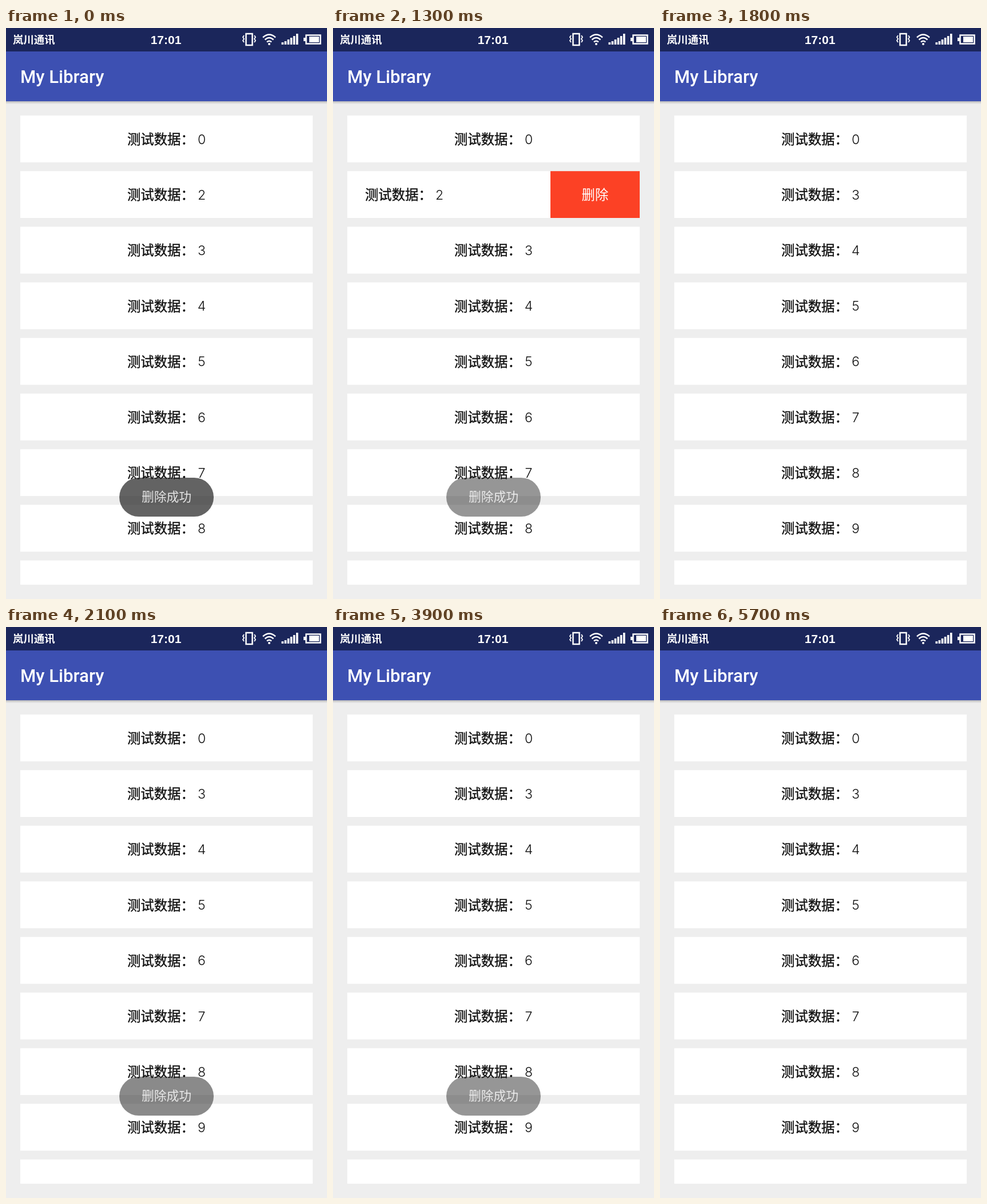
These frames come from a looping animation (561x998 px, 6100 ms). An HTML page:

```html
<!DOCTYPE html>
<html lang="zh-CN">
<head>
<meta charset="utf-8">
<title>My Library</title>
<style>
  html, body { margin: 0; width: 100%; height: 100%; overflow: hidden; background: #eee; }
  svg { display: block; width: 100%; height: 100%; }
  text { font-family: "Noto Sans CJK SC", "Noto Sans CJK", sans-serif; font-size: 23.4px; fill: #fff; }
  .item text { fill: #111; }
  .item .label { stroke: #111; stroke-width: .4px; }
  .item .num { font-family: Inter, "Liberation Sans", sans-serif; font-weight: 300; font-size: 23px; text-anchor: middle; }
  .title { font: 500 31.2px Roboto, sans-serif; }
  .carrier { font-size: 18.4px; font-weight: bold; }
  .clock { font: bold 21px "Liberation Sans", sans-serif; text-anchor: middle; }
  .line { fill: none; stroke: #fff; stroke-width: 2.5; }
  .mid { text-anchor: middle; }
</style>
</head>
<body>
<svg viewBox="0 0 561 998">
  <defs>
    <linearGradient id="shade" x2="0" y2="1">
      <stop stop-color="#000" stop-opacity=".22"/>
      <stop offset="1" stop-color="#000" stop-opacity="0"/>
    </linearGradient>
    <clipPath id="list"><rect x="25" y="133" width="511" height="840"/></clipPath>
  </defs>
  <rect width="561" height="998" fill="#eee"/>
  <g id="rows" clip-path="url(#list)"></g>

  <rect y="128" width="561" height="5" fill="url(#shade)"/>
  <rect y="40" width="561" height="88" fill="#3d50b2"/>
  <rect width="561" height="41" fill="#1b265b"/>
  <text class="title" x="24.900" y="95.700">My Library</text>
  <text class="carrier" x="12" y="27">岚川通讯</text>
  <text class="clock" x="279.5" y="28.300">17:01</text>

  <rect class="line" x="419.5" y="10" width="11" height="20"/>
  <path class="line" style="stroke-width:1.8" d="M416 13l-2 3 2 3-2 3 2 3M434 13l2 3-2 3 2 3-2 3"/>
  <path class="line" d="M449 16.5q11-10 22 0M452.5 20.5q7.500-7 15 0M456 24.500q4-3.500 8 0"/>
  <circle cx="460" cy="28" r="2" fill="#fff"/>
  <g id="signal" fill="#fff"></g>
  <rect class="line" x="524.5" y="12.5" width="25" height="15"/>
  <path fill="#fff" d="M520 17h4v6h-4zM530 15h17v10h-17z"/>

  <g id="toast">
    <rect x="198" y="786" width="165" height="68" rx="34" fill="#222" fill-opacity=".7"/>
    <text class="mid" style="font-size:21.8px;fill:#e4e4e4" x="280.5" y="826.5">删除成功</text>
  </g>
</svg>
<script>
const LOOP = 6100, STEP = 100, PITCH = 97.2, MENU = 156;
const $ = id => document.getElementById(id);
const clamp = v => Math.max(0, Math.min(1, v));
const smooth = v => v * v * (3 - 2 * v);

$("signal").innerHTML = [4, 6, 9, 12, 15, 19].map((h, i) =>
  `<rect x="${481.5 + i * 5.1}" y="${29 - h}" width="3.6" height="${h}"/>`).join("");

const label = `<text class="label" x="211.9" y="50">测试数据：</text><text class="num" x="342" y="49.5"></text>`;

// The last row is cut off above its label
$("rows").innerHTML = Array.from({ length: 9 }, (_, i) => `
  <g transform="translate(0 ${153 + i * PITCH})"><g class="item">
    <rect x="25" width="511" height="81.8" fill="#fff"/>${i < 8 ? label : ""}
  </g></g>`).join("");

const items = [...document.querySelectorAll(".item")];
const nums = [...document.querySelectorAll(".num")];
items[1].insertAdjacentHTML("beforeend",
  `<rect x="536" width="${MENU}" height="81.8" fill="#fc4125"/>
   <text class="mid" style="fill:#fff" x="614" y="50">删除</text>`);

// Share of a run done, counting the step that begins at start
const run = (t, start, steps) => clamp((t - start + STEP) / (steps * STEP));

function toastAlpha(t) {
  if (t < 1800) return 1 - run(t, 1200, 6);
  const shown = 1 - (1 - run(t, 1900, 6)) ** 2;
  return shown * (1 - run(t, 3800, 6));
}

function draw(now) {
  const t = Math.floor(now % LOOP / STEP) * STEP;
  const removed = t >= 1800;
  const slide = removed ? 0 : MENU * smooth(run(t, 300, 5));
  items[1].setAttribute("transform", `translate(${-slide} 0)`);
  nums.forEach((n, i) => n.textContent = i ? i + 1 + removed : 0);
  $("toast").setAttribute("opacity", toastAlpha(t));
}

let begin;
function tick(now) {
  begin ??= now;
  draw(now - begin);
  requestAnimationFrame(tick);
}
draw(0);
requestAnimationFrame(tick);
</script>
</body>
</html>
```
